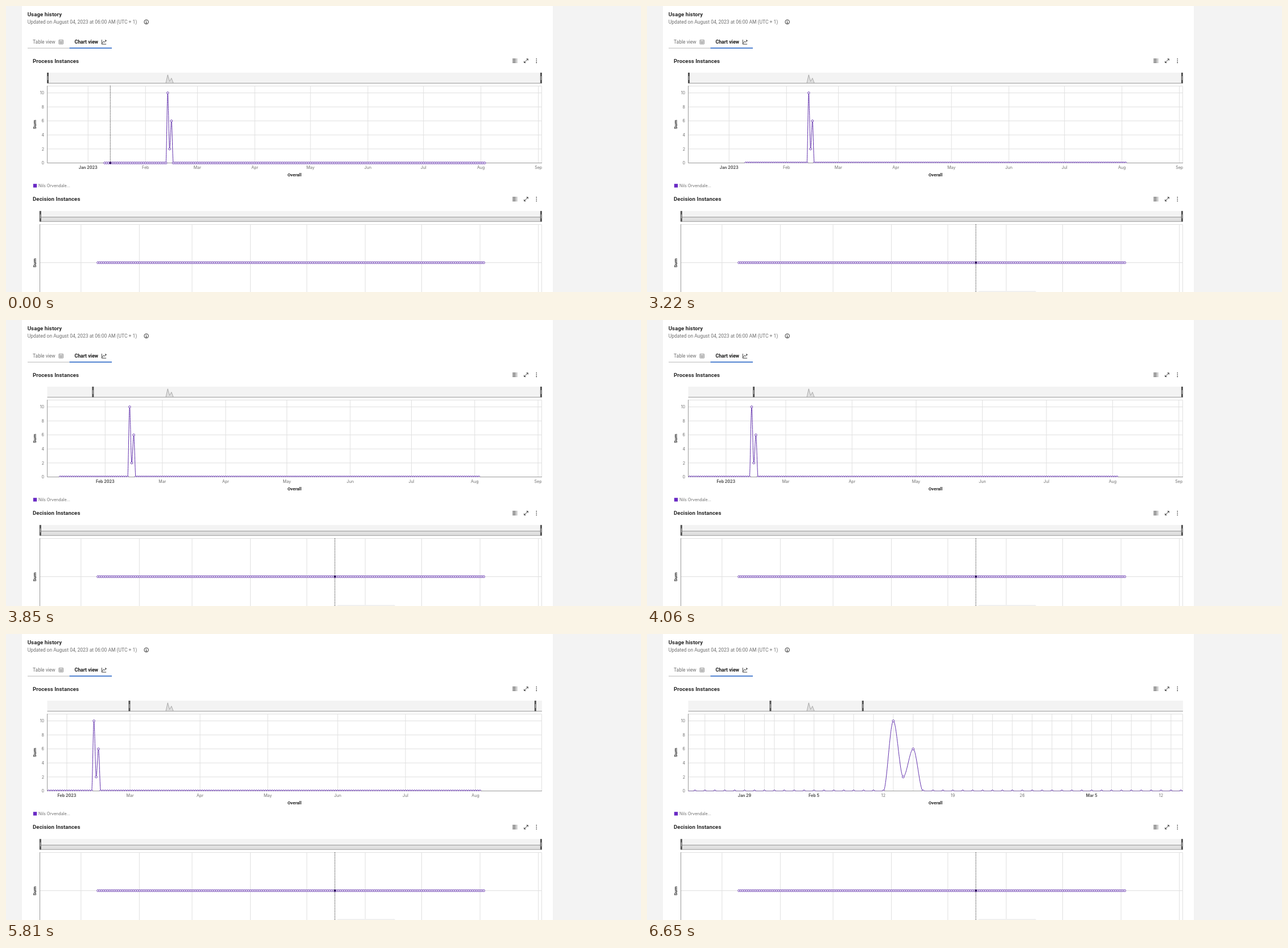
These frames come from a looping animation (1116x502 px, 8000 ms). An HTML page:

```html
<!DOCTYPE html>
<html lang="en">
<head>
<meta charset="utf-8">
<title>Usage history</title>
<style>
  html, body { margin: 0; width: 100%; height: 100%; overflow: hidden; background: #f3f3f3; }
  svg { display: block; width: 100%; height: 100%; }
  text { font-family: Roboto, sans-serif; fill: #6f6f6f; }
  .title { font-size: 9.6px; font-weight: 600; fill: #262626; letter-spacing: .1px; }
  .body { font-size: 8.5px; }
  .active { font-size: 8.7px; font-weight: 600; fill: #161616; }
  .axis-title { font-size: 7.8px; font-weight: 700; fill: #262626; text-anchor: middle; }
  .tick { font: 7.1px Inter, sans-serif; text-anchor: middle; }
  .num { text-anchor: end; }
  .primary { font-weight: 700; fill: #525252; }
  .legend { font: 7.2px Inter, sans-serif; }
  .grid { stroke: #e0e0e0; fill: none; }
  .axis { stroke: #9a9a9a; fill: none; }
  .icon { stroke: #262626; fill: none; }
  .series { stroke: #6232ac; fill: none; }
  .points { stroke: #6232ac; fill: #fff; stroke-width: .95; }
  .ruler { stroke: #222; stroke-dasharray: 1.4 1.4; }
</style>
</head>
<body>
<svg viewBox="0 0 1116 502" preserveAspectRatio="none">
  <defs><clipPath id="plot"><rect x="72.5" y="140" width="869.5" height="135.5"/></clipPath></defs>
  <rect x="28" width="933" height="502" fill="#fff"/>
  <g id="header"></g>
  <g id="process"></g>
  <g id="decision"></g>
</svg>
<script>
const LOOP = 8000, STEP = 70;
const LEFT = 72.5, RIGHT = 941.5, BASE = 275.5, UNIT = 12.3;
const FIRST_DAY = 9, LAST_DAY = 214, HOVER_DAY = 12;
const peaks = { 43: 10, 44: 2, 45: 6 };   // days counted from Jan 1
const valueOn = day => peaks[day] || 0;

const overviewX = day => 144.2 + 3.257 * day;
const overviewDay = x => (x - 144.2) / 3.257;
const decisionX = day => 131.8 + 3.308 * day;
const dateOf = day => new Date(Date.UTC(2023, 0, 1 + day));
const monthName = date => date.toLocaleString('en-US', { month: 'short', timeZone: 'UTC' });

const $ = id => document.getElementById(id);
const range = (a, b) => Array.from({ length: b - a + 1 }, (_, i) => a + i);
const label = (x, y, cls, str) => `<text x="${x}" y="${y}" class="${cls}">${str}</text>`;
const path = (d, cls, extra = '') => `<path d="${d}" class="${cls}" ${extra}/>`;
const rect = (x, y, w, h, fill) => `<rect x="${x}" y="${y}" width="${w}" height="${h}" fill="${fill}"/>`;
const dot = (x, y, r = 1.8) => `<circle cx="${x.toFixed(2)}" cy="${y}" r="${r}"/>`;
const vertical = (x, y0, y1) => `M${x.toFixed(2)} ${y0}V${y1}`;
const sumLabel = y => `<text class="axis-title" transform="translate(52.6 ${y}) rotate(-90)">Sum</text>`;
const hoverMark = (x, y, y0, y1) =>
  path(vertical(x, y0, y1), 'ruler') + `<g fill="#31135e">${dot(x, y, 2)}</g>`;

const handle = (x, y) => rect(x - 1.5, y, 3, 18.5, '#525252') + rect(x - .35, y + 6, .8, 7, '#e8e8e8');

function toolbar(y) {
  const rows = [-3.2, -1.1, 1, 3.1].map(d => `M890.2 ${y + d}h5.9m1 0h1.2`).join('');
  return path(rows, 'icon', 'stroke-width=".9"') +
    path(`M910.7 ${y + 3.3}l6.6-6.6m-2.8 0h2.8v2.8m-6.6 1v2.8h2.8`, 'icon', 'stroke-width=".9"') +
    [-3.2, 0, 3.2].map(d => dot(932.3, y + d, .8)).join('');
}

function drawHeader(focused) {
  const blue = '#2b67c6';
  $('header').innerHTML =
    label(37.7, 18.4, 'title', 'Usage history') +
    label(37.7, 31, 'body', 'Updated on August 04, 2023 at 06:00 AM (UTC + 1)') +
    `<circle cx="246.6" cy="28" r="3.8" class="icon" stroke-width=".9"/>` +
    path('M245.5 27.4h1.2v2.7m-1.4 0h2.7M246.5 25.4v.9', 'icon', 'stroke-width=".8"') +
    label(47, 66.2, 'body', 'Table view') +
    path('M93.1 59.7h7.2v7h-7.2zM93.1 62h7.2m-7.2 2.3h7.2M96.7 62v4.7', 'icon', 'stroke-width=".75" style="stroke:#6f6f6f"') +
    label(120.5, 66.2, 'active', 'Chart view') +
    path('M168.3 59.2v7.8h7.8M169.3 65.5l2.2-3.6 2 1.9 2.4-3.7m-2 0h2v2', 'icon', 'stroke-width=".9"') +
    rect(38, 73.5, 73.5, 1, '#b5b5b5') +
    (focused
      ? `<rect x="111.9" y="51.9" width="73.4" height="22.2" fill="none" stroke="${blue}" stroke-width="1.5"/>`
      : rect(111.5, 73, 74.5, 1.6, blue));
}

// Picks months, weeks or every second day, whichever suits the wanted count.
function ticks(start, end, count) {
  const gap = (end - start) / count;
  const fits = gap > 14.5 ? d => d.getUTCDate() === 1
    : gap > 3.74 ? d => d.getUTCDay() === 0
    : d => d.getUTCDate() % 2 === 1;
  return range(Math.ceil(start), Math.floor(end)).filter(day => fits(dateOf(day)));
}

function tickLabels(start, end, x) {
  const monthly = (end - start) / 7 > 14.5;
  let last = '';
  return ticks(start, end, 7).map((day, i) => {
    const date = dateOf(day), month = monthName(date);
    const primary = monthly ? i === 0 : month !== last;
    const str = monthly ? month + (primary ? ' 2023' : '') : (primary ? month + ' ' : '') + date.getUTCDate();
    last = month;
    return label(x(day).toFixed(2), 285.8, primary ? 'tick primary' : 'tick', str);
  }).join('');
}

// Every turning point is flat, so each curve piece has level control points.
function seriesPath(x, y) {
  let d = `M${x(FIRST_DAY)} ${y(0)}H${x(42)}`;
  for (let day = 42; day < 46; day++) {
    const a = y(valueOn(day)), b = y(valueOn(day + 1));
    d += `C${x(day + 1 / 3)} ${a} ${x(day + 2 / 3)} ${b} ${x(day + 1)} ${b}`;
  }
  return d + `H${x(LAST_DAY)}`;
}

function drawProcess(from, to, zoomed, hovered) {
  const start = overviewDay(from), end = overviewDay(to);
  const x = day => LEFT + (day - start) / (end - start) * (RIGHT - LEFT);
  const y = v => BASE - UNIT * v;
  const days = range(Math.max(FIRST_DAY, Math.ceil(start)), Math.min(LAST_DAY, Math.floor(end)));
  const levels = [0, 2, 4, 6, 8, 10];
  const mini = range(42, 46).map(d => `${overviewX(d)} ${135.3 - 1.45 * valueOn(d)}`).join('L');
  const axes = path(`M${LEFT} 140V${BASE}H942`, 'axis');
  const data = `<g ${zoomed ? 'clip-path="url(#plot)"' : ''}>` +
    path(seriesPath(x, y), 'series') +
    `<g class="points">${days.map(d => dot(x(d), y(valueOn(d)))).join('')}</g></g>`;

  $('process').innerHTML =
    label(47, 99.7, 'title', 'Process Instances') + toolbar(96.2) +
    rect(72.5, 117, 869.5, 18.5, '#f3f3f3') +
    path('M' + mini, 'axis', 'style="fill:#e0e0e0" stroke-width=".8"') +
    path('M72.5 135.5H942', 'axis') +
    handle(Math.max(from, 73.5), 117) + handle(Math.min(to, 940.4), 117) +
    path(`M${LEFT} 140.5H${RIGHT}V${BASE}` +
      levels.map(v => `M${LEFT} ${y(v)}H${RIGHT}`).join('') +
      ticks(start, end, 15).map(d => vertical(x(d), 140, BASE)).join(''), 'grid') +
    axes + data +
    (hovered ? hoverMark(x(HOVER_DAY), BASE, 140, BASE) : '') +
    levels.map(v => label(67, y(v) + 2.7, 'tick num', v)).join('') +
    tickLabels(start, end, x) +
    sumLabel(208) + label(507, 298.9, 'axis-title', 'Overall') +
    rect(47.8, 312.2, 6.4, 6.4, '#6929c4') +
    label(57, 317.9, 'legend', 'Nils Orvendale...');
}

function drawDecision(hovered, tooltip) {
  const x = decisionX, y = 450.5;
  const points = range(FIRST_DAY, LAST_DAY).map(d => dot(x(d), y)).join('');
  $('decision').innerHTML =
    label(47, 342.4, 'title', 'Decision Instances') + toolbar(339) +
    rect(59, 359.8, 883, 18.5, '#f3f3f3') + rect(59, 370.5, 883, 7.8, '#e0e0e0') +
    path('M59 370.5H942M59 378.2H942', 'axis') +
    handle(60.3, 359.8) + handle(940.4, 359.8) +
    path(`M59.5 383.5H941.5V502M59.5 ${y}H941.5` +
      ticks(-21, 244, 15).map(d => vertical(x(d), 383, 502)).join(''), 'grid') +
    path('M59.5 383V502', 'axis') + sumLabel(451) +
    path(`M${x(FIRST_DAY)} ${y}H${x(LAST_DAY)}`, 'series') +
    `<g class="points">${points}</g>` +
    (hovered ? hoverMark(x(135) - .4, y, 383, 502) : '') +
    (tooltip ? `<rect x="582" y="500" width="102" height="9" rx="2" fill="#f0f0f0"/>` : '');
}

const linear = u => u;
const easeIn = u => u ** 1.3;
const easeOut = u => 1 - (1 - u) ** 1.4;
const smooth = u => u * u * (3 - 2 * u);

// Drag pieces: start ms, end ms, from x, to x, easing.
const leftDrag = [
  [3220, 3850, LEFT, 152.8, easeIn],
  [3850, 4340, 152.8, 216.9, easeOut],
];
const rightDrag = [
  [5740, 5810, RIGHT, 930.3, linear],
  [5810, 6230, 930.3, 370, smooth],
  [6370, 6650, 370, 379.3, linear],
];
function dragAt(pieces, t) {
  let pos = pieces[0][2];
  for (const [t0, t1, a, b, ease] of pieces)
    if (t > t0) pos = a + (b - a) * ease(Math.min(1, (t - t0) / (t1 - t0)));
  return pos;
}

const drawn = {};
function update(name, draw, ...args) {
  const key = args.join();
  if (drawn[name] === key) return;
  drawn[name] = key;
  draw(...args);
}

function render(now) {
  const t = Math.floor((now % LOOP) / STEP + 1e-6) * STEP;
  update('header', drawHeader, t >= 1610 && t < 3220);
  update('process', drawProcess, dragAt(leftDrag, t), dragAt(rightDrag, t), t >= 3220, t < 2240);
  update('decision', drawDecision, t >= 420, t >= 490);
}

const began = performance.now();
function tick() {
  render(performance.now() - began);
  requestAnimationFrame(tick);
}
tick();
</script>
</body>
</html>
```
